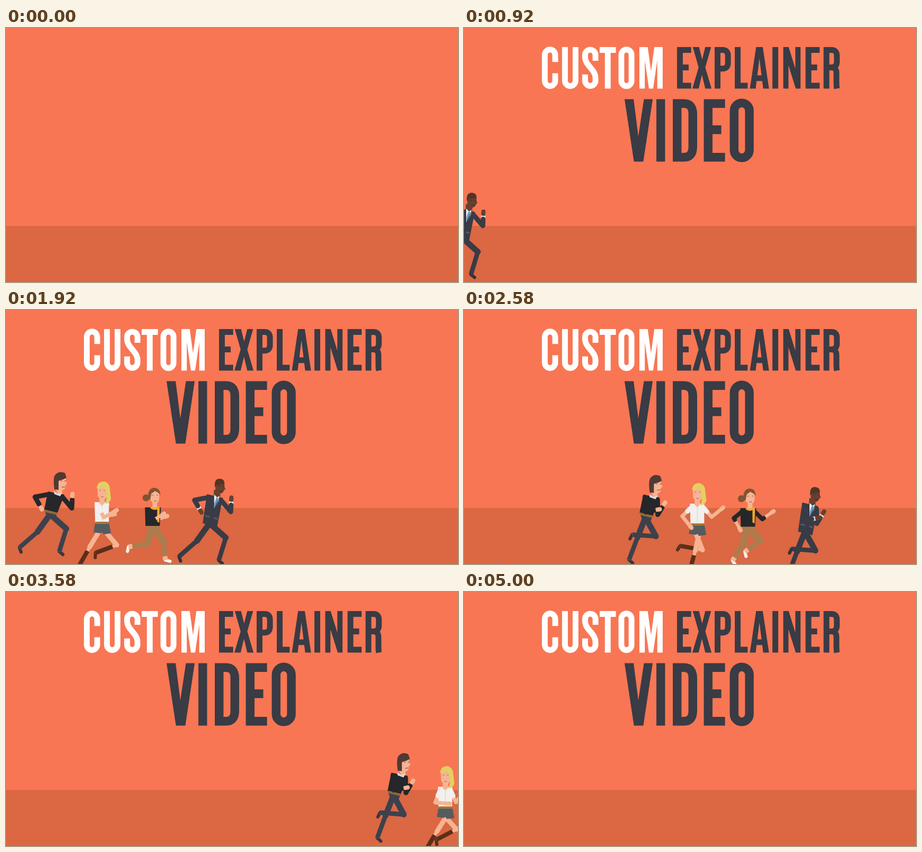
An HTML page that plays this animation: 853 by 480 pixels, repeating every 5080 ms.

```html
<!DOCTYPE html>
<html lang="en">
<head>
<meta charset="utf-8">
<title>Custom explainer video</title>
<style>
html, body { margin: 0; width: 100%; height: 100%; overflow: hidden; background: #f87653; }
svg { display: block; width: 853px; height: 480px; }
</style>
</head>
<body>
<svg viewBox="0 0 853 480">
  <rect width="853" height="480" fill="#f87653"/>
  <rect y="374" width="853" height="106" fill="#db6743"/>
  <g id="words"></g>
  <g id="runners" fill="none" stroke-linejoin="round"></g>
</svg>
<script>
const LOOP = 5080, STEP = LOOP / 61, SPEED = 0.389, MEET = 1920;
const INK = '#393b45';

// Condensed capitals, 100 units high: monoline strokes and solid shapes.
const strokes = {
  C: 'M32 36V19A12.5 13 0 0 0 7 19V81A12.5 13 0 0 0 32 81V63',
  U: 'M7 0V81A12.7 13 0 0 0 32.4 81V0',
  S: 'M32 33V19A12.5 12.5 0 0 0 7 19V24C7 45 32 53 32 75V81A12.5 12.5 0 0 1 7 81V66',
  T: 'M0 7H39M19.5 0V100',
  O: 'M7 18.5A12.2 12.5 0 0 1 31.4 18.5V81.5A12.2 12.5 0 0 1 7 81.5Z',
  E: 'M34 7H7V93H34M7 49H28',
  P: 'M7 100V7H19Q32 7 32 21V38Q32 52 19 52H7',
  L: 'M7 0V93H31',
  I: 'M7 0V100',
  R: 'M7 100V7H19Q32 7 32 21V35Q32 49 19 49H7M19 49Q31 49 31 63V86Q31 94 32 100',
  D: 'M7 7H18Q32 7 32 24V76Q32 93 18 93H7Z'
};
const solids = {
  V: 'M0 0H14.5L22 59.5 31 0H45L30 100H15Z',
  A: 'M0 100L15 0H31L46 100H32L29.7 82H16L14 100ZM18 68H28L23 27Z',
  X: 'M1 0H16L23.5 30 31 0H45L31 49 46 100H31L23 67 15 100H0L15 49Z',
  M: 'M0 0H20L28 58 36 0H56V100H43V32L33 100H23L13 32V100H0Z',
  N: 'M0 0H13L29 52V0H41.5V100H30L12.5 44V100H0Z'
};

const words = [
  { text: 'CUSTOM', at: [147, 185, 223, 256, 291.5, 331], y: 36, size: 0.785, color: '#fff', start: 24 },
  { text: 'EXPLAINER', at: [402, 431, 473, 511, 539.5, 582, 602.5, 644.5, 678.5], y: 36, size: 0.785, color: INK, start: 274 },
  { text: 'VIDEO', at: [303, 363, 394, 452.5, 501.5], y: 134.5, size: 1.18, color: INK, start: 524 }
];

const glyph = (ch, x) => {
  const style = solids[ch]
    ? 'fill="currentColor" fill-rule="evenodd"'
    : 'fill="none" stroke="currentColor" stroke-width="13.9"';
  return `<path d="${solids[ch] || strokes[ch]}" ${style} transform="translate(${x} 0)"/>`;
};

document.getElementById('words').innerHTML = words.map(w =>
  `<g role="img" aria-label="${w.text}" color="${w.color}">` +
  [...w.text].map((ch, i) => glyph(ch, (w.at[i] - w.at[0]) / w.size)).join('') + '</g>').join('');
const wordNodes = document.getElementById('words').children;

function placeWord(w, node, t) {
  const p = Math.min(1, Math.max(0, (t - w.start) / 330));
  const zoom = 1 + 1.38 * (1 - p) ** 2;
  const y = w.y + 80 * w.size * (zoom - 1);
  node.setAttribute('transform', `translate(${w.at[0]} ${y}) scale(${w.size * zoom})`);
  node.setAttribute('opacity', Math.min(1, p * 2.25));
}

// Limb angles in degrees from straight down, forward positive, over one stride.
const THIGH = [49, 33, 8, -26, -35, -32, 4, 33];
const SHIN = [-25, 8, -5, -24, -43, -85, -105, -88];

function cyclic(keys, phase) {
  const n = keys.length, x = (phase - Math.floor(phase)) * n, i = Math.floor(x), f = x - i;
  const [a, b, c, d] = [-1, 0, 1, 2].map(k => keys[(i + k + n) % n]);
  return b + f / 2 * (c - a + f * (2 * a - 5 * b + 4 * c - d + f * (3 * (b - c) + d - a)));
}

const along = ([x, y], length, deg) => {
  const r = deg * Math.PI / 180;
  return [x + length * Math.sin(r), y + length * Math.cos(r)];
};
const line = (pts, color, width, dash = '', cap = 'butt') =>
  `<path d="M${pts.map(p => p.map(v => v.toFixed(1))).join('L')}" pathLength="100" stroke="${color}" ` +
  `stroke-width="${width}" stroke-linecap="${cap}"${dash && ` stroke-dasharray="${dash}"`}/>`;
const shape = (d, color) => `<path d="${d}" fill="${color}"/>`;
const thin = (d, color, width = 1) => `<path d="${d}" stroke="${color}" stroke-width="${width}"/>`;

function leg(r, phase, hip) {
  const shin = cyclic(SHIN, phase);
  const knee = along(hip, r.thigh, r.lead + cyclic(THIGH, phase) * r.stride);
  const ankle = along(knee, r.shin, shin);
  const calf = r.legWidth * 0.78;
  return line([ankle, along(ankle, 9, shin + 68)], r.shoe, 6, '', 'round') +
    line([knee, ankle], r.skin, calf - 1) +
    (r.pants ? line([knee, ankle], r.pants, calf, `${r.pantsTo} 200`) : '') +
    (r.boots ? line([knee, ankle], r.boots, calf + 1, '0 20 100') : '') +
    line([hip, knee], r.pants || r.skin, r.legWidth, '', 'round');
}

function arm(r, shoulder, bend, phase) {
  const c = Math.cos(phase * 2 * Math.PI), passing = 1 - c * c;
  const upper = r.armMid + r.swing * c + r.lift * passing;
  const lower = upper + bend - 12 * c + r.fold * passing;
  const elbow = along(shoulder, r.upper, upper), wrist = along(elbow, r.lower, lower);
  const pts = [shoulder, elbow, wrist];
  return line(pts, r.skin, r.armWidth - 2) +
    (r.cuff ? line(pts, r.cuff, r.armWidth - 1, '93 200') : '') +
    line(pts, r.sleeve, r.armWidth, `${r.sleeveTo} 200`, 'round') +
    line([wrist, along(wrist, 4, lower)], r.skin, 8, '', 'round');
}

const PALE = '#f7b392', DARK = '#67402e', BLACK = '#25272a';
const man = { stride: 1, lead: 0, thigh: 41, shin: 45, legWidth: 11, pantsTo: 100, hips: 0, period: 500, phase: 0.03,
  armPhase: 0.4, armMid: -26, swing: 68, lift: 28, fold: 0, bends: [98, 148],
  upper: 28, lower: 23, armWidth: 9, bob: 6.7 };
const woman = { armMid: -3, swing: 48, lift: 5, fold: 45, bends: [68, 92] };

const runners = [
  { ...man, x: 85, y: 386, drift: -0.0075, skin: PALE, pants: '#3d414c', shoe: '#3a3440',
    sleeve: BLACK, sleeveTo: 86, shoulders: [[-1, -38], [23, -33]],
    body: shape('M-11 -9L14 -3 10 7 -6 5Z', '#3d414c') +
      shape('M-4 -43L27 -37 14 -3 -11 -9Z', BLACK) +
      thin('M-11 -7L13 -1', '#b47a35', 4) + thin('M-10 -7L12 -1', '#6a4425', 1) +
      shape('M10 -49H23V-39L16 -36Z', PALE) + shape('M7 -44L15 -39 23 -41 19 -34 8 -38Z', '#ddd9d5'),
    head: shape('M12 -72L29 -73 30 -62 32 -58 29 -55 28 -48Q22 -43 14 -48Z', PALE) +
      shape('M8 -47Q5 -70 10 -75Q17 -83 28 -78L31 -69 25 -66 16 -63 16 -46Z', '#513a34') +
      thin('M20 -63H23M27 -63H30M22 -51L28 -52', '#69443a') },
  { ...woman, x: 183, y: 416, drift: 0.003, skin: PALE, boots: '#5b2f19', shoe: '#5b2f19', stride: 1, lead: 0,
    thigh: 37, shin: 43, legWidth: 9, hips: 4, period: 474, phase: 0.925, armPhase: 0.24,
    upper: 27, lower: 24, armWidth: 9, sleeve: '#f3efed', sleeveTo: 26, bob: 1.5, shoulders: [[-9, -48], [9, -48]],
    body: shape('M-13 -14H13L17 6 3 8 0 4 -3 6 -16 4Z', '#565b60') +
      shape('M-14 -53H13V-15H-13Z', '#f3efed') +
      thin('M-13 -14H13', '#c48b39', 4) + thin('M-12 -14H13', '#755525', 1) +
      shape('M-5 -60H5V-51L0 -46 -5 -51Z', PALE) + thin('M-6 -53L0 -46 6 -53M0 -46V-17', '#d5cecb'),
    head: shape('M-9 -84H10V-65Q5 -55 -3 -58L-8 -64Z', PALE) +
      shape('M-10 -79Q-9 -92 4 -92Q15 -89 15 -76L17 -59Q14 -50 6 -50Q11 -63 7 -77L3 -83 -4 -79Z', '#e2d160') +
      thin('M-5 -75H-2M3 -75H6M-2 -63H3', '#986450') },
  { ...woman, x: 278, y: 406, drift: 0, skin: PALE, pants: '#ad7c4d', pantsTo: 80, shoe: '#f4efec', stride: 0.7, lead: 9,
    thigh: 37, shin: 36, legWidth: 13, hips: 0, period: 500, phase: 0.12, armPhase: 0.06,
    upper: 22, lower: 22, armWidth: 8, sleeve: BLACK, sleeveTo: 58, bob: 1, shoulders: [[-9, -28], [12, -28]],
    body: shape('M-13 0H14L11 10 -7 10Z', '#ad7c4d') + shape('M-14 -33H16L14 2H-13Z', BLACK) +
      shape('M0 -43H9V-33L5 -29 0 -33Z', PALE) +
      thin('M-3 -33Q5 -27 13 -34', '#f2a72e', 4) + shape('M9 -33L14 -31 13 -4 9 -6Z', '#f2a72e'),
    head: '<circle cx="-12" cy="-51" r="6.5" fill="#805430"/>' +
      shape('M-5 -65H13V-48Q10 -39 3 -40L-4 -47Z', PALE) +
      shape('M-8 -47Q-10 -69 3 -70Q15 -70 15 -56L12 -60 5 -64 -2 -59 -4 -48Z', '#805430') +
      thin('M-1 -56H2M8 -56H11M3 -45H8', '#8c5543') },
  { ...man, x: 386, y: 403, drift: 0.0075, skin: DARK, pants: INK, shoe: '#30323a',
    sleeve: INK, cuff: '#f0eeed', sleeveTo: 80, shoulders: [[-1, -49], [22, -43]],
    body: shape('M-5 -55L25 -48 14 7 -13 0Z', INK) + shape('M8 -63H20V-51L14 -47 8 -54Z', DARK) +
      shape('M8 -55L14 -49 20 -52 17 -42 8 -26Z', '#f0eeed') +
      shape('M13 -49L16 -48 15 -38 9 -28 9 -37Z', '#659bc8') +
      thin('M8 -55L8 -25 20 -52', '#2c2e36') + thin('M-8 -14L0 -12M8 -10L15 -8', '#555967', 3),
    head: shape('M11 -77Q12 -85 20 -84Q28 -83 28 -75V-69L30 -65 27 -62Q25 -55 17 -56L11 -62Z', DARK) +
      shape('M10 -68Q8 -85 20 -84Q29 -83 28 -74L13 -72Z', '#543427') +
      thin('M16 -70H20M24 -70H28M19 -61H25', '#382820') }
];

function drawRunner(r, t) {
  const x = r.x + SPEED * (t - MEET);
  if (x < -80 || x > 940) return '';
  const phase = r.phase + (t - MEET) / r.period;
  const y = r.y + r.drift * (t - MEET) + r.bob * (1 - Math.cos(4 * Math.PI * (phase - r.phase)));
  const [near, far] = r.shoulders;
  return `<g transform="translate(${x.toFixed(2)} ${y.toFixed(2)})">` +
    arm(r, far, r.bends[1], phase + r.armPhase + 0.5) +
    leg(r, phase + 0.5, [-r.hips, 0]) + leg(r, phase, [r.hips, 0]) +
    r.body + r.head + arm(r, near, r.bends[0], phase + r.armPhase) + '</g>';
}

const runnerLayer = document.getElementById('runners');

function render(ms) {
  const t = Math.floor(((ms % LOOP) + 5) / STEP) % 61 * STEP;
  words.forEach((w, i) => placeWord(w, wordNodes[i], t));
  runnerLayer.innerHTML = runners.map(r => drawRunner(r, t)).join('');
}

const begin = performance.now();
function tick() {
  render(performance.now() - begin);
  requestAnimationFrame(tick);
}
tick();
</script>
</body>
</html>
```
